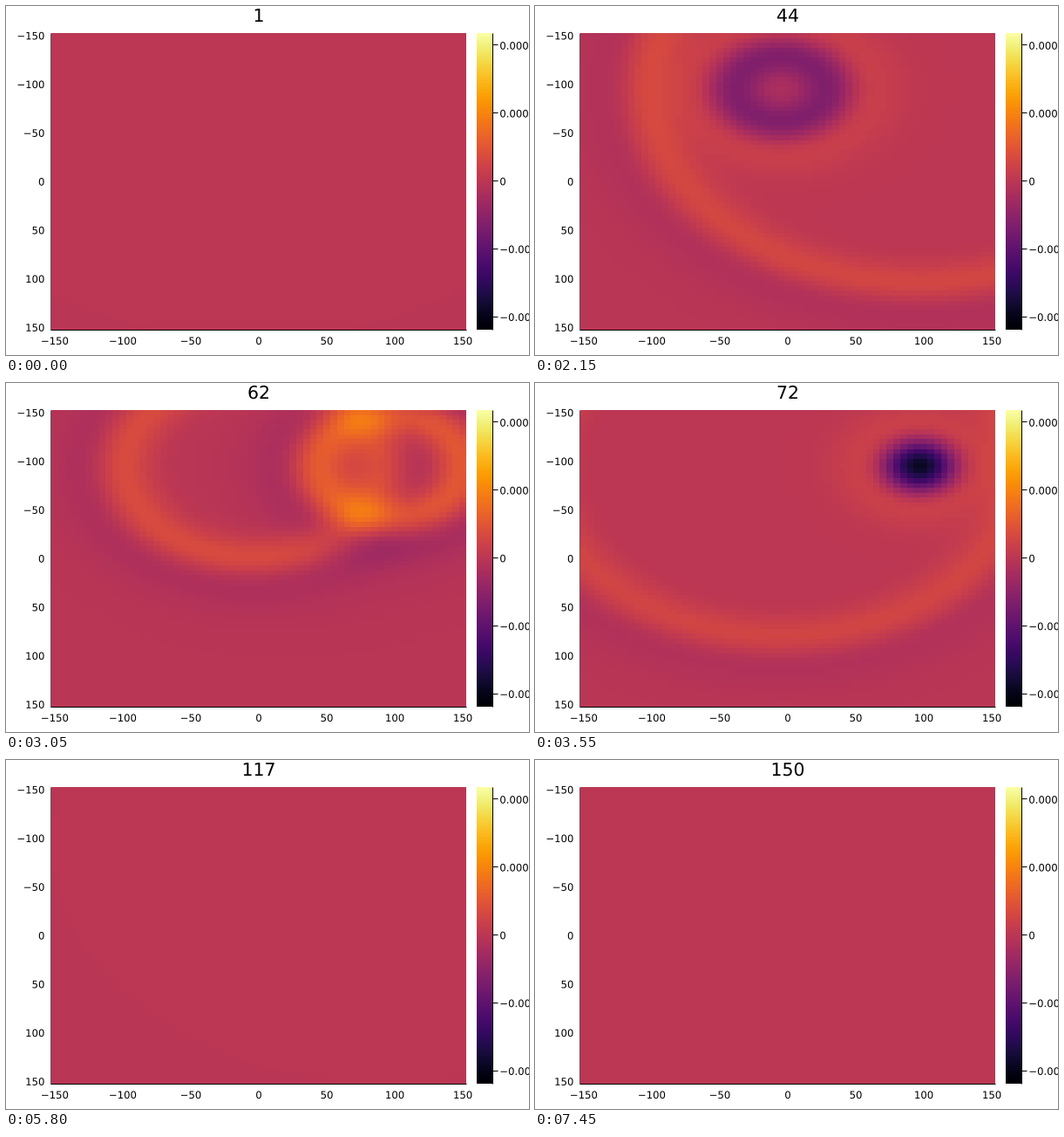
Animation of 600x400 px, one loop 7.5 s. Source, as a matplotlib script:

```python
import numpy as np
import matplotlib.pyplot as plt
from matplotlib.animation import FuncAnimation
from matplotlib.patches import PathPatch
from matplotlib.textpath import TextPath
from matplotlib.transforms import Affine2D

W, H, DPI = 600, 400, 100
LEFT, RIGHT, TOP, BOTTOM = 52, 528, 31, 371
MID_X, MID_Y = (LEFT + RIGHT) / 2, (TOP + BOTTOM) / 2
FRAMES, STEP_MS = 150, 50
TICK_PX, TITLE_PX = 11.66, 20.4

SPEED = 8.1    # distance units per step
WIDTH = 1.95   # pulse width in steps
# x, y, focusing time, amplitude
PULSES = [(-5, -95, 49.4, 0.8), (97, -95, 69.6, -0.92)]

grid = np.linspace(-150, 150, 61)
X, Y = np.meshgrid(grid, grid)
radii = np.linspace(0, 400, 201)
theta = (np.arange(200) + 0.5) * np.pi / 200
delay = np.outer(radii, np.cos(theta)) / SPEED


def pulse(t):
    s = t / WIDTH
    return s * np.exp((1 - s * s) / 2)


def field(t):
    """Circular waves that converge on each focus and spread out again."""
    u = np.zeros_like(X)
    for x, y, t0, amp in PULSES:
        profile = pulse(t - t0 + delay).mean(axis=1)
        u += amp * np.interp(np.hypot(X - x, Y - y), radii, profile)
    return u


plt.rcParams["font.family"] = "DejaVu Sans"
fig = plt.figure(figsize=(W / DPI, H / DPI), dpi=DPI, facecolor="white")
ax = fig.add_axes([0, 0, 1, 1])


def text_path(x, y, text, px, align=0.5):
    """Unhinted outline; align is 0 for left, 0.5 for centre, 1 for right."""
    text = text.replace("-", "\u2212")
    digit = 0.6362
    advance = px * sum({"\u2212": 0.8379, ".": 0.3179}.get(c, digit) for c in text)
    place = Affine2D().scale(1, -1).translate(x - align * advance, y)
    return place.transform_path(TextPath((0, 0), text, size=px))


def label(x, y, text, align=0.5, px=TICK_PX):
    path = text_path(x, y, text, px, align)
    return ax.add_patch(PathPatch(path, fc="black", lw=0, snap=False, zorder=3))


def line(xs, ys, color="black"):
    ax.plot(xs, ys, color=color, lw=72 / DPI, solid_capstyle="butt", zorder=3)


def colors(data, box, lo=-1):
    return ax.imshow(data, cmap="inferno", vmin=lo, vmax=1, aspect="auto",
                     interpolation="nearest", extent=box)


heat = colors(field(1), (LEFT, RIGHT, BOTTOM, TOP))
colors(np.linspace(1, 0, 256)[:, None], (540, 558, BOTTOM, TOP), lo=0)
ax.set(xlim=(0, W), ylim=(H, 0))
ax.axis("off")

line([LEFT - 1] * 2, [TOP, BOTTOM], color="0.35")
line([LEFT - 1, RIGHT], [BOTTOM] * 2)
line([558] * 2, [TOP, BOTTOM])

for v in range(-150, 151, 50):
    label(MID_X + v * (RIGHT - LEFT) / 305, 388, str(v))
    label(44.4, MID_Y + 4.6 + v * (BOTTOM - TOP) / 305, str(v), align=1)

for k in range(-2, 3):
    y = MID_Y - 77.8 * k
    line([558, 564], [y - 1, y - 1])
    label(566.3, y + 4.3, f"{k / 10000:.4f}" if k else "0", align=0)

title = label(MID_X, 18, "1", px=TITLE_PX)


def draw(i):
    heat.set_data(field(i + 1))
    title.set_path(text_path(MID_X, 18, str(i + 1), TITLE_PX))
    return heat, title


anim = FuncAnimation(fig, draw, frames=FRAMES, interval=STEP_MS,
                     repeat=True, repeat_delay=0)
plt.show()
```
